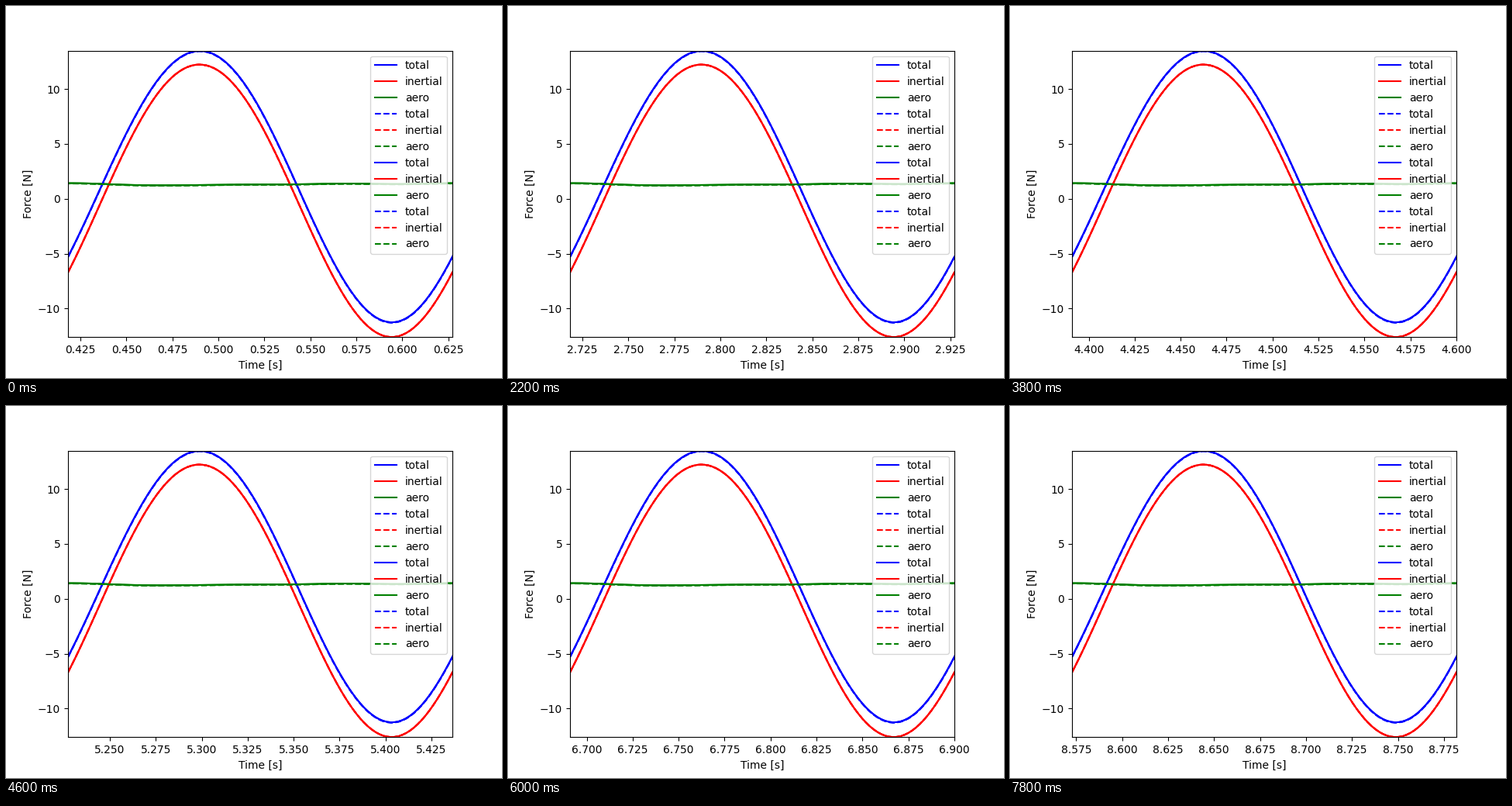
Write a matplotlib script that moves like this. It is 640x480 px and loops after 8 s.

```python
import numpy as np
import matplotlib.pyplot as plt
from matplotlib.animation import FuncAnimation

PERIOD = 2.3 / 11        # one force cycle, also the width of the view
FRAMES = 40
FIRST = 2                # cycle shown at the start
AERO = [1.42, 1.305, 1.225, 1.265, 1.30, 1.335, 1.385, 1.345]


def aero(u):
    """Smooth periodic curve through eight evenly spaced values."""
    c = np.fft.rfft(AERO) / len(AERO)
    c[1:-1] *= 2
    return sum((ck * np.exp(2j * np.pi * k * u)).real for k, ck in enumerate(c))


def inertial(u):
    a = 2 * np.pi * (u - 0.342)
    return 12.41 * np.cos(a) - 0.19 * np.cos(2 * a)


fig, ax = plt.subplots(figsize=(6.4, 4.8), dpi=100)

cycles = np.linspace(0, FRAMES + 4, (FRAMES + 4) * 100 + 1)
t = cycles * PERIOD
f_in, f_aero = inertial(cycles), aero(cycles)

for style, drop in [("-", 0), ("--", 0.03)] * 2:
    ax.plot(t, f_in + f_aero - drop, "b" + style, label="total")
    ax.plot(t, f_in, "r" + style, label="inertial")
    ax.plot(t, f_aero - drop, "g" + style, label="aero")

ax.set_ylim(-12.6, 13.49)
ax.set_xlabel("Time [s]")
ax.set_ylabel("Force [N]")
ax.legend(loc="upper right")


def update(i):
    start = (FIRST + i) * PERIOD
    ax.set_xlim(start, start + PERIOD)
    return ax.lines


anim = FuncAnimation(fig, update, frames=FRAMES, interval=200,
                     init_func=lambda: update(0), repeat=True, repeat_delay=0)
plt.show()
```
